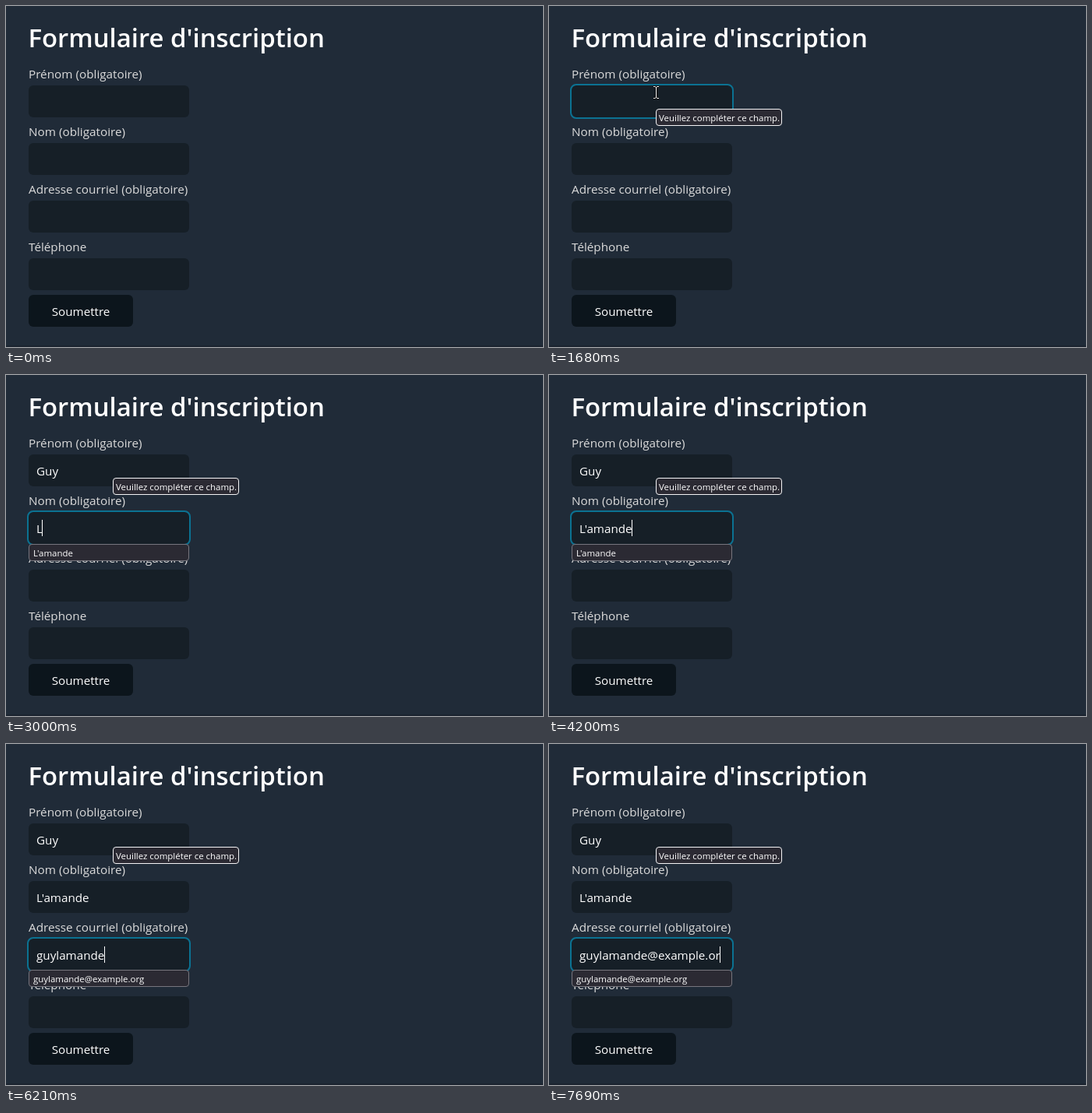
Write an HTML page that moves like this. It is 689 px wide and 438 px high and loops after 8000 ms.

```html
<!DOCTYPE html>
<html lang="fr">
<head>
<meta charset="utf-8">
<title>Formulaire d'inscription</title>
<style>
  html, body { margin: 0; width: 100%; height: 100%; overflow: hidden; background: #202b38; }
  svg { display: block; width: 689px; height: 438px; }
  text { font: 15.2px "Open Sans", "Noto Sans", sans-serif; fill: #fff; white-space: pre; }
  .title { font-size: 32.9px; font-weight: 600; }
  .label { font-size: 15.27px; fill: #dbdbdb; }
  .popup text { font-size: 11.45px; }
  .popup rect { fill: #2b2a33; }
</style>
</head>
<body>
<svg id="stage" viewBox="0 0 689 438">
  <rect width="689" height="438" fill="#202b38"/>
  <rect y="436" width="689" height="2" fill="#1b2430"/>
  <text class="title" x="28.5" y="53">Formulaire d'inscription</text>
</svg>
<script>
const LOOP = 8000;
const FIELD_X = 29, FIELD_W = 206, FIELD_H = 41, ROW = 74, FIRST_Y = 102;
const stage = document.getElementById('stage');

// focus: when the field gains focus; keys: time of each typed character
const fields = [
  { label: 'Prénom (obligatoire)', text: 'Guy', focus: 980, blur: 2580,
    keys: [1940, 2140, 2340] },
  { label: 'Nom (obligatoire)', text: "L'amande", focus: 2580, blur: 4380,
    keys: [2930, 3130, 3400, 3600, 3800, 4000, 4070, 4200] },
  { label: 'Adresse courriel (obligatoire)', text: 'guylamande@example.org', focus: 4380, blur: LOOP,
    keys: [4870, 5000, 5070, 5200, 5330, 5460, 5600, 5860, 6060, 6210, 6410,
           6610, 6810, 6880, 7020, 7160, 7220, 7350, 7490, 7560, 7690] },
  { label: 'Téléphone', text: '', focus: LOOP, blur: LOOP, keys: [] }
];

function add(tag, attrs, parent = stage, text = '') {
  const el = document.createElementNS('http://www.w3.org/2000/svg', tag);
  for (const name in attrs) el.setAttribute(name, attrs[name]);
  el.textContent = text;
  parent.append(el);
  return el;
}

const show = (el, on) => el.setAttribute('visibility', on ? 'visible' : 'hidden');
const clamp = v => Math.max(0, Math.min(1, v));

function popup(x, y, w, border, textX, text) {
  const g = add('g', { class: 'popup' });
  add('rect', { x: x + .5, y: y + .5, width: w - 1, height: 21, rx: 3.5, stroke: border }, g);
  add('text', { x: textX, y: y + 16 }, g, text);
  return g;
}

fields.forEach((f, i) => {
  f.y = FIRST_Y + i * ROW;
  add('text', { class: 'label', x: FIELD_X, y: f.y - 9 }, stage, f.label);
  add('rect', { x: FIELD_X, y: f.y, width: FIELD_W, height: FIELD_H, rx: 6, fill: '#161f27' });
  f.ring = add('rect', { x: FIELD_X - 1, y: f.y - 1, width: FIELD_W + 2, height: FIELD_H + 2, rx: 7,
    fill: 'none', stroke: '#0096bf', 'stroke-width': 2 });
  f.value = add('text', { x: 39, y: f.y + 27 });
  f.caret = add('rect', { y: f.y + 10, width: 1, height: 21, fill: '#fff' });
});

add('rect', { x: 29, y: 371, width: 134, height: 41, rx: 6, fill: '#0c151c' });
add('text', { x: 96, y: 398, 'text-anchor': 'middle' }, stage, 'Soumettre');

// Lists snap to whole pixels from a slightly tighter row pitch than the fields.
fields.forEach((f, i) => {
  f.list = popup(FIELD_X, Math.floor(143.5 + i * 73.5), FIELD_W, '#77767e', 35, f.text);
});
const tooltip = popup(137, 132, 162, '#f4f4f6', 141, 'Veuillez compléter ce champ.');

const arrow = add('path', { d: 'M.5.5V16.5L4 13l2.5 5.5 2.5-1L6.7 12H11.5Z', fill: '#fff', stroke: '#000' });
const beam = add('g', {});
const beamPath = 'M-3-7.5h2L.5-6.5l1.5-1h2M.5-6.5v13M-3 7.5h2l1.5-1 1.5 1h2';
add('path', { d: beamPath, fill: 'none', stroke: '#000', 'stroke-width': 2.4 }, beam);
add('path', { d: beamPath, fill: 'none', stroke: '#fff' }, beam);

const bezier = (a, b, c, p) => (1 - p) ** 2 * a + 2 * p * (1 - p) * b + p * p * c;

function drawPointer(t) {
  const p = clamp(Math.floor((t - 210) / 67) / 10);
  const x = Math.round(bezier(559, 262, 137, p));
  const y = Math.round(bezier(428, 314, 111, p));
  const visible = t >= 210 && t < fields[0].keys[0];
  const overField = x >= FIELD_X && x < FIELD_X + FIELD_W && (y - FIRST_Y) % ROW < FIELD_H;
  for (const el of [arrow, beam]) el.setAttribute('transform', `translate(${x} ${y})`);
  show(arrow, visible && !overField);
  show(beam, visible && overField);
}

function drawField(f, t) {
  const focused = t >= f.focus && t < f.blur;
  const typed = f.keys.filter(k => k <= t).length;
  const glow = clamp((t - f.focus) / 150) - clamp((t - f.blur) / 150);
  f.ring.setAttribute('opacity', .67 * glow);
  f.value.textContent = f.text.slice(0, typed);
  const width = typed ? f.value.getComputedTextLength() : 0;
  f.caret.setAttribute('x', Math.floor(39 + width));
  const blinkedOff = t >= 1410 && t < 1940;
  show(f.caret, focused && !blinkedOff);
  show(f.list, focused && t >= f.keys[0] + 70);
}

function draw(now) {
  const t = now % LOOP;
  for (const f of fields) drawField(f, t);
  show(tooltip, t >= 1680);
  drawPointer(t);
}

const start = performance.now();
function tick() {
  draw(performance.now() - start);
  requestAnimationFrame(tick);
}
tick();
</script>
</body>
</html>
```
